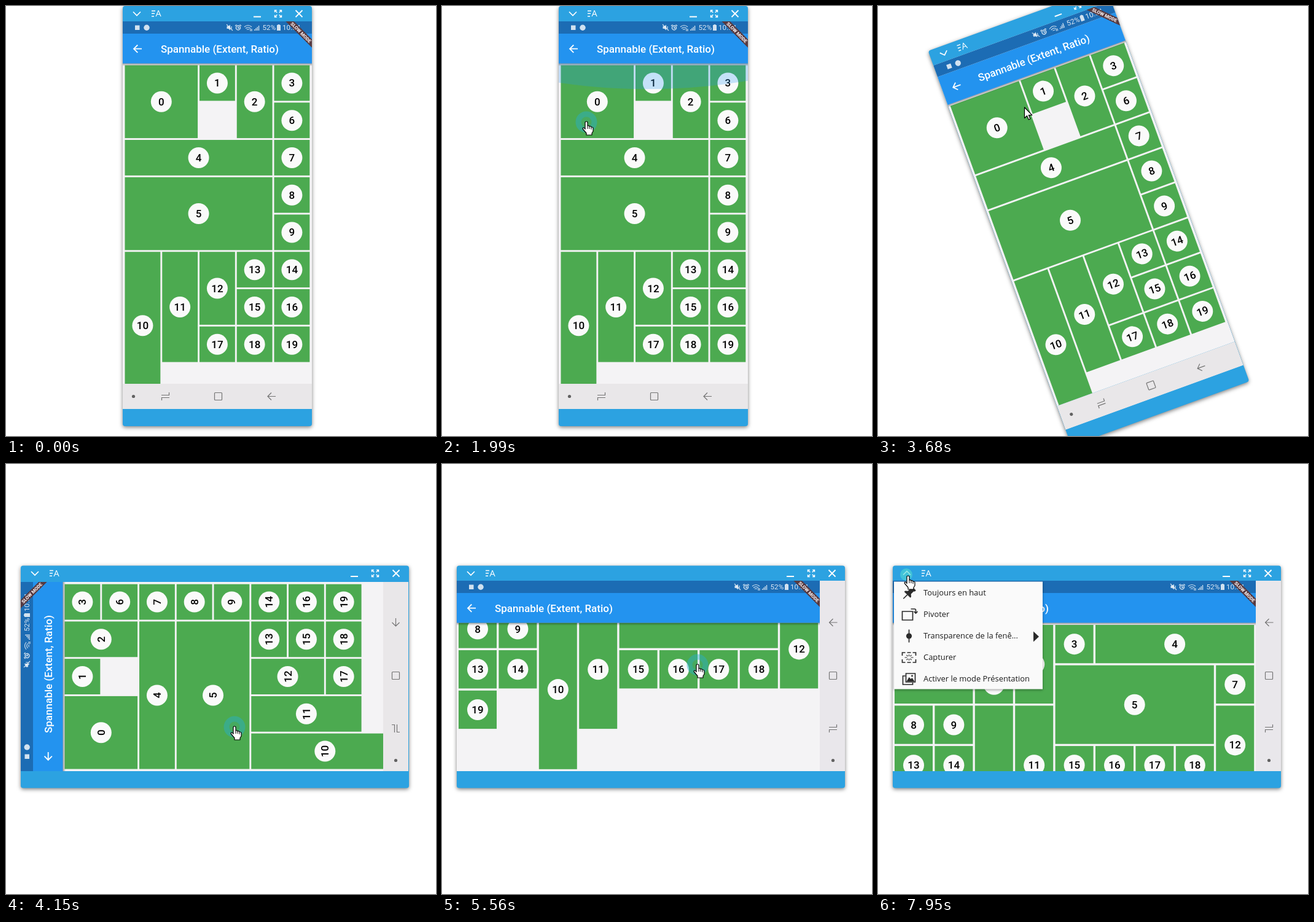
Recreate the animation shown at these times as an HTML page with a canvas. Size 700 px wide and 700 px high, loop 8 s.

```html
<!DOCTYPE html>
<html lang="fr">
<head>
<meta charset="utf-8">
<title>Spannable grid</title>
<style>
html, body { margin: 0; height: 100%; overflow: hidden; background: #fff; }
canvas { display: block; }
</style>
</head>
<body>
<canvas id="stage" width="700" height="700"></canvas>
<script>
const ctx = document.getElementById('stage').getContext('2d');
const LOOP = 8000, STEP = 1000 / 13;
const BAR = '#2ca2e1', DARK = '#2b2b2b';

// ---- helpers ----
const ramp = (t, a, b) => Math.min(1, Math.max(0, (t - a) / (b - a)));
const smooth = p => p * p * (3 - 2 * p);
const within = (t, spans) => spans.some(([a, b]) => t >= a && t < b);

// Eased value between keys of the form [time, ...values].
function track(t, keys) {
  let i = 0;
  while (i < keys.length - 2 && t >= keys[i + 1][0]) i++;
  const [a, ...from] = keys[i], [b, ...to] = keys[i + 1];
  const p = smooth(ramp(t, a, b));
  return from.map((v, k) => v + (to[k] - v) * p);
}

function at(x, y, angle, draw) {
  ctx.save();
  ctx.translate(x, y);
  ctx.rotate(angle);
  draw();
  ctx.restore();
}

function rect(x, y, w, h, color) {
  ctx.fillStyle = color;
  ctx.fillRect(x, y, w, h);
}

function disc(x, y, r, color) {
  ctx.fillStyle = color;
  ctx.beginPath();
  ctx.arc(x, y, r, 0, 7);
  ctx.fill();
}

function fill(path, color) {
  ctx.fillStyle = color;
  ctx.fill(new Path2D(path));
}

function line(path, color, width = 1.2) {
  ctx.strokeStyle = color;
  ctx.lineWidth = width;
  ctx.stroke(new Path2D(path));
}

function text(string, x, y, font, color, align = 'left') {
  ctx.font = font;
  ctx.fillStyle = color;
  ctx.textAlign = align;
  ctx.fillText(string, x, y);
}

function clip(x, y, w, h) {
  ctx.beginPath();
  ctx.rect(x, y, w, h);
  ctx.clip();
}

// ---- grid: each tile goes to the leftmost lowest gap of the skyline ----
const SPANS = { 0: [2, 2], 2: [1, 2], 4: [4, 1], 5: [4, 2], 10: [1, 4], 11: [1, 3], 12: [1, 2] };

function pack(columns) {
  const heights = Array(columns).fill(0);
  return Array.from({ length: 20 }, (_, i) => {
    const [w, h] = SPANS[i] || [1, 1];
    let col = 0, row = Infinity;
    for (let c = 0; c + w <= columns; c++) {
      const top = Math.max(...heights.slice(c, c + w));
      if (top < row) { row = top; col = c; }
    }
    heights.fill(row + h, col, col + w);
    return { col, row, w, h };
  });
}

const PORTRAIT = { w: 308, h: 590, x: 3.5, y: 71.5, dx: 60.75, dy: 60.75, gap: 2.9, tiles: pack(5) };
const LANDSCAPE = { w: 591, h: 310, x: 3, y: 72, dx: 65.4, dy: 65.7, gap: 3.4, tiles: pack(9), wide: true };

function drawGrid(view, scroll) {
  view.tiles.forEach(({ col, row, w, h }, i) => {
    const x = view.x + col * view.dx, y = view.y + row * view.dy - scroll;
    const tw = w * view.dx - view.gap, th = h * view.dy - view.gap;
    rect(x, y, tw, th, '#4caa50');
    disc(x + tw / 2, y + th / 2, 17, '#fafafa');
    text(i, x + tw / 2, y + th / 2 + 6, '500 17px Roboto, sans-serif', '#000', 'center');
  });
}

function drawGlow(view, amount, bottom) {
  if (amount <= 0) return;
  const radius = 1000, depth = 44 * Math.sqrt(amount);
  const y = bottom ? view.h - depth + radius : 69 + depth - radius;
  disc(view.w / 2 - 10, y, radius, `rgba(33,150,243,${0.28 * amount})`);
}

// ---- phone screen ----
function drawStatus(w) {
  const ink = 'rgba(255,255,255,.8)';
  rect(0, 0, w, 20, '#1c6cb4');
  rect(20, 6.5, 7.5, 7.5, ink);
  disc(39, 10.2, 4.7, ink);
  at(w - 134, 10, 0, () => {
    fill('M-4.5-2H-2L1-4.5V4.5L-2 2H-4.5Z', ink);
    line('M-5-5L5 5M3-2V2', ink);
  });
  at(w - 120, 10.5, 0, () => {
    line('M0-3.5A3.5 3.5 0 1 1-.1-3.5M0-2V.5H2M-5-3L-2.5-5M5-3L2.5-5', ink, 1.4);
  });
  at(w - 104, 11, 0, () => {
    line('M-6-2Q0-7 6-2M-4 .5Q0-3 4 .5M-2 2.5Q0 1 2 2.5M4 1V5M6 1V5', ink, 1.1);
  });
  for (let i = 0; i < 4; i++) rect(w - 94 + i * 2.3, 13 - i * 2, 1.3, 2 + i * 2, ink);
  text('52%', w - 80.5, 14.3, '11.7px Roboto, sans-serif', '#dce8f4');
  fill(`M${w - 57} 6H${w - 55.5}V5H${w - 52.5}V6H${w - 51}V15H${w - 57}Z`, ink);
  text('10:54', w - 48, 14.3, '11.7px Roboto, sans-serif', '#dce8f4');
}

function drawNav(view) {
  const ink = '#747474';
  if (view.wide) rect(view.w, 0, 41, view.h, '#e9e7eb');
  else rect(0, view.h, view.w, 41, '#e9e7e9');
  const place = (along, draw) => view.wide
    ? at(view.w + 21.5, view.h - along, 0, draw)
    : at(along, view.h + 20.5, 0, draw);
  place(17.5, () => disc(0, 0, 2.6, '#626262'));
  place(69.5, () => line('M-6.5-2H6V-6.5M6.5 2H-6V6.5', ink));
  place(155.5, () => line('M-5-6H5Q6-6 6-5V5Q6 6 5 6H-5Q-6 6-6 5V-5Q-6-6-5-6Z', ink));
  place(242, () => line('M7 0H-6M0-6L-6 0L0 6', ink));
}

function drawScreen(view, scroll, topGlow, bottomGlow) {
  const { w, h } = view;
  ctx.save();
  clip(0, 0, w + (view.wide ? 41 : 0), h + (view.wide ? 0 : 41));
  rect(0, 0, w, h, '#f4f3f5');
  ctx.save();
  clip(0, 68.5, w, h - 68.5);
  drawGrid(view, scroll);
  drawGlow(view, topGlow, false);
  drawGlow(view, bottomGlow, true);
  ctx.restore();
  const shade = ctx.createLinearGradient(0, 68, 0, 73);
  shade.addColorStop(0, 'rgba(0,0,0,.38)');
  shade.addColorStop(1, 'rgba(0,0,0,0)');
  rect(0, 68, w, 5, shade);
  rect(0, 20, w, 48.5, '#2393ef');
  drawStatus(w);
  at(24, 44.7, 0, () => line('M7 0H-6M.3-6.2L-6 0L.3 6.2', '#fff', 1.8));
  text('Spannable (Extent, Ratio)', 62, 50.5, '500 17px Roboto, sans-serif', '#fff');
  at(w, 0, Math.PI / 4, () => {
    rect(-50, 20.6, 100, 9.6, '#573a41');
    text('SLOW MODE', 0, 28.2, '900 7.7px Roboto, sans-serif', '#f4ecec', 'center');
  });
  drawNav(view);
  ctx.restore();
}

// ---- window ----
function drawWindow(w, h, menuOpen) {
  ctx.save();
  ctx.shadowColor = 'rgba(0,0,0,.5)';
  ctx.shadowBlur = 6;
  ctx.shadowOffsetY = 2;
  ctx.fillStyle = BAR;
  ctx.beginPath();
  ctx.roundRect(0, 0, w, h, 4);
  ctx.fill();
  ctx.restore();
  line(menuOpen ? 'M17 15L23 9L29 15' : 'M17 9.5L23 15.5L29 9.5', '#fff', 1.7);
  line('M47 8H53M47 12.3H52M47 16.8H51', '#fff', 1.4);
  text('A', 58, 17.3, '14.5px "Open Sans", sans-serif', '#fff', 'center');
  line(`M${w - 95} 17.5H${w - 83}`, '#fff', 2);
  for (let k = 0; k < 4; k++) {
    at(w - 55, 12.5, k * Math.PI / 2, () => line('M-5.5-2.2V-5.5H-2.2M-5.5-5.5L-1.7-1.7', '#fff', 1.4));
  }
  at(w - 21, 12.5, 0, () => line('M-5.5-5.5L5.5 5.5M5.5-5.5L-5.5 5.5', '#fff', 1.8));
}

const MENU = [
  ['Toujours en haut', () => at(0, 0, Math.PI / 4, () => {
    fill('M-5-11H5V-8.5L3.5-7V-1L7 2V4H-7V2L-3.5-1V-7L-5-8.5Z', DARK);
    line('M0 4V13', DARK, 1.6);
  })],
  ['Pivoter', wide => line(wide
    ? 'M-11-5H6V9H-11ZM3-9H9Q11-9 11-7V-2M8-5L11-2L14-5'
    : 'M-8-5H5V11H-8ZM-4-9H4Q8-9 8-6M2-12L-2-9L2-6', DARK, 1.7)],
  ['Transparence de la fenê...', () => {
    line('M0-10.5V10.5', DARK, 1.7);
    disc(0, 0, 4.6, DARK);
  }],
  ['Capturer', () => {
    line('M-11-3V-8H-6M-3-8H3M6-8H11V-3M11 3V8H6M3 8H-3M-6 8H-11V3', DARK, 1.7);
    line('M-7 0H-3M3 0H7M0-5V-2M0 2V5M-4-4L-2-2M4-4L2-2M-4 4L-2 2M4 4L2 2', DARK, 1.1);
  }],
  ['Activer le mode Présentation', () => {
    line('M-5-9H10V5H-5ZM-6-5H-10V9H6V6', DARK, 1.7);
    fill('M-4 4L0-3L3 0L5-2L9 4Z', DARK);
    disc(5, -5, 1.4, DARK);
  }]
];

function drawMenu(wide) {
  ctx.save();
  ctx.shadowColor = 'rgba(0,0,0,.35)';
  ctx.shadowBlur = 4;
  ctx.shadowOffsetY = 1;
  rect(2, 26, 242, 175, '#fafafa');
  ctx.restore();
  MENU.forEach(([label, icon], i) => {
    const y = 44 + i * 35;
    at(26.5, y + 0.5, 0, () => icon(wide));
    text(label, 50, y + 4.8, '12.9px "Open Sans", "Noto Sans", sans-serif', '#1c1c1c');
  });
  fill('M229 107L238 115.5L229 124Z', DARK);
}

// ---- pointer ----
const POINTER = [
  [220, 531, 330], [620, 330, 420], [700, 330, 420], [1150, 262, 150], [1250, 262, 150],
  [1700, 240, 290], [1800, 240, 290], [1985, 235, 188], [2600, 218, 12], [2990, 218, 12],
  [3300, 262, 82], [3440, 262, 82], [3680, 238.5, 165], [4100, 372, 427], [4820, 372, 427],
  [5230, 402, 46], [5280, 402, 46], [5520, 416, 326], [5800, 416, 326], [6450, 420, 588],
  [6750, 420, 588], [7700, 49, 182], [8000, 49, 182]
];
const ARROW_TIMES = [[0, 480], [2250, 2520], [2990, 4080], [5050, 5420], [6250, 6900]];
const DRAGS = [[650, 2050], [4080, 5250], [5480, 6520]];
const CLICKS = [[2640, 2960], [3340, 3440], [7740, 8000]];

function drawPointer(t) {
  if (t < 215) return;
  const [x, y] = track(t, POINTER);
  at(x, y, 0, () => {
    if (within(t, DRAGS)) {
      ctx.strokeStyle = 'rgba(38,174,205,.45)';
      ctx.lineWidth = 9;
      ctx.beginPath();
      ctx.arc(0, 1, 13, 0, 7);
      ctx.stroke();
      disc(0, 1, 8.5, 'rgba(38,174,205,.12)');
    }
    if (within(t, CLICKS)) disc(-3, -2, 10, 'rgba(80,215,210,.6)');
    ctx.lineJoin = 'round';
    const shape = within(t, ARROW_TIMES)
      ? 'M0 0V17.5L4 13.7L6.8 20L9.5 18.8L6.8 12.7H12.3Z'
      : 'M-2 2Q-2 0 0 0Q2 0 2 2V7Q4 6 5 8Q7 7 8 9Q11 9 11 11V16L9 19V22H0V19L-5.5 12.5Q-6.5 10-4.5 10Q-3 10.5-2 12.5Z';
    fill(shape, '#fff');
    line(shape, '#000', 1.2);
    if (!within(t, ARROW_TIMES)) line('M2 7V12M5 8V12M8 9V13', '#000', 1);
  });
}

// ---- scene ----
function draw(t) {
  rect(0, 0, 700, 700, '#fff');
  const menuOpen = within(t, [[2750, 3440], [7825, LOOP]]);
  if (t < 4135) {
    const angle = ramp(t, 3550, 4138) * Math.PI / 2;
    const [scroll] = track(t, [[720, 0], [1000, 29], [1300, 29], [1480, 0]]);
    const topGlow = ramp(t, 1480, 1700) * (1 - ramp(t, 1930, 2400));
    const bottomGlow = ramp(t, 930, 1060) * (1 - ramp(t, 1150, 1400));
    at(344, 345, -angle, () => {
      ctx.translate(-154, -345);
      drawWindow(308, 684, menuOpen);
      at(0, 25, 0, () => drawScreen(PORTRAIT, scroll, topGlow, bottomGlow));
      if (menuOpen) drawMenu(false);
    });
  } else {
    const [scroll] = track(t, [[4850, 0], [5180, 156], [5820, 156], [6260, 0]]);
    const topGlow = ramp(t, 6230, 6420) * (1 - ramp(t, 6520, 6950));
    const bottomGlow = ramp(t, 5080, 5180) * (1 - ramp(t, 5230, 5480));
    const turned = ramp(t, 4400, 4620);
    at(24, 165.5, 0, () => {
      drawWindow(632, 362, menuOpen);
      if (turned < 1) at(0, 334.5, -Math.PI / 2, () => drawScreen(PORTRAIT, 0, 0, 0));
      ctx.globalAlpha = turned;
      if (turned > 0) at(0, 24.5, 0, () => drawScreen(LANDSCAPE, scroll, topGlow, bottomGlow));
      ctx.globalAlpha = 1;
      if (menuOpen) drawMenu(true);
    });
  }
  drawPointer(t);
}

const start = performance.now();
function tick() {
  const t = (performance.now() - start) % LOOP;
  draw(Math.floor((t + 15) / STEP) * STEP - 12);
  requestAnimationFrame(tick);
}
tick();
</script>
</body>
</html>
```
